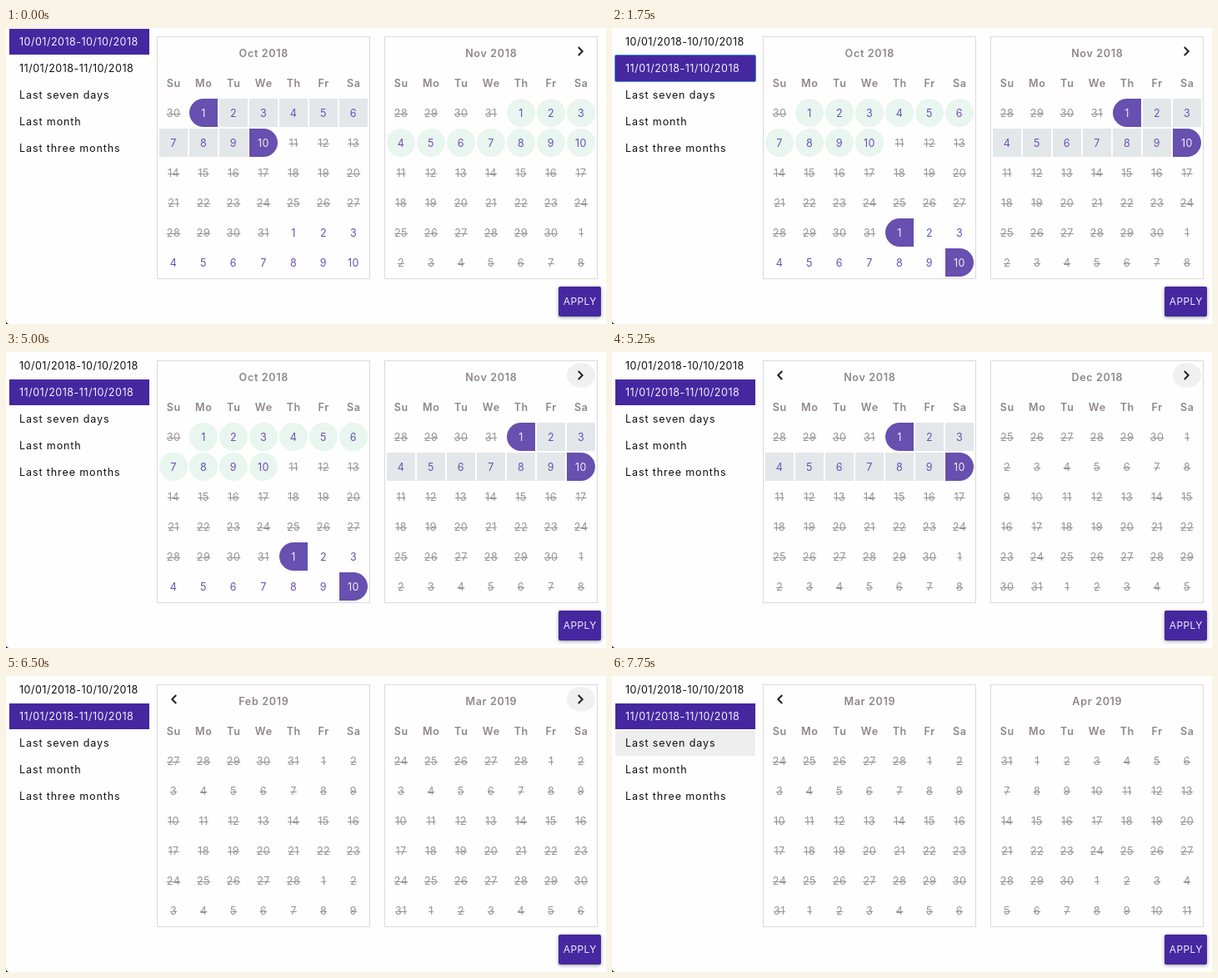
These frames come from a looping animation (720x356 px, 8 s). An HTML page with a canvas:

```html
<!DOCTYPE html>
<html lang="en">
<head>
<meta charset="utf-8">
<title>Date range picker</title>
<style>
  html, body { margin: 0; width: 100%; height: 100%; overflow: hidden; background: #fefefe; }
  canvas { display: block; width: 720px; height: 356px; }
</style>
</head>
<body>
<canvas id="stage" width="720" height="356"></canvas>
<script>
const ctx = document.getElementById('stage').getContext('2d');
const LOOP = 8000;
const FONT = 'Inter, "Open Sans", sans-serif';
const INDIGO = '#4527a0', VIOLET = '#6750b0', GREY = '#949494', HEAD = '#8e8787';
const MONTHS = 'Jan Feb Mar Apr May Jun Jul Aug Sep Oct Nov Dec'.split(' ');
const DAYS = 'Su Mo Tu We Th Fr Sa'.split(' ');
const PRESETS = ['10/01/2018-10/10/2018', '11/01/2018-11/10/2018',
  'Last seven days', 'Last month', 'Last three months'];

// Each step keeps the earlier values; month counts from January 2018.
const STEPS = [
  { at: 0, month: 9, picked: 0, focus: false, hoverItem: -1, hoverNext: false, fading: false },
  { at: 1250, focus: true, hoverItem: 1 },
  { at: 1500, picked: 1, hoverItem: -1 },
  { at: 4500, hoverNext: true },
  { at: 5000, focus: false },
  { at: 5250, month: 10 },
  { at: 5500, month: 11, fading: true },
  { at: 5750, month: 12, fading: false },
  { at: 6250, month: 13 },
  { at: 7250, month: 14, hoverNext: false },
  { at: 7750, hoverItem: 2 }
];
const FIRST = 9, LAST = 14;

function stateAt(time) {
  return Object.assign({}, ...STEPS.filter(step => step.at <= time));
}

function text(str, x, y, color, { size = 12.5, weight = 400, gap = 0.5, align = 'center' } = {}) {
  ctx.font = `${weight} ${size}px ${FONT}`;
  ctx.letterSpacing = gap + 'px';
  ctx.textAlign = align;
  ctx.fillStyle = color;
  ctx.fillText(str, x, y);
  return ctx.measureText(str).width;
}

function box(x, y, w, h, color, radii = 0) {
  ctx.fillStyle = color;
  ctx.beginPath();
  ctx.roundRect(x, y, w, h, radii);
  ctx.fill();
}

function drawPresets(s) {
  PRESETS.forEach((label, i) => {
    const y = 1 + 32 * i, on = i === s.picked;
    if (on) box(4, y, 168, 31, INDIGO);
    else if (i === s.hoverItem) box(4, y, 168, 31, '#eeeeee');
    if (i === 1 && s.focus) {
      ctx.strokeStyle = on ? '#4a8fd8' : '#8fb5ee';
      ctx.lineWidth = on ? 1 : 1.6;
      ctx.beginPath();
      ctx.roundRect(3.5, y - 0.5, 169, 32, 1.5);
      ctx.stroke();
    }
    text(label, 16, y + 20, on ? '#f4f1fb' : '#111111', { align: 'left', gap: i < 2 ? 0.5 : 0.9 });
  });
}

// dir is 1 for a right-pointing chevron, -1 for a left-pointing one
function chevron(x, dir) {
  ctx.strokeStyle = '#222222';
  ctx.lineWidth = 2;
  ctx.beginPath();
  ctx.moveTo(x - 2.5 * dir, 23);
  ctx.lineTo(x + 2.4 * dir, 28);
  ctx.lineTo(x - 2.5 * dir, 33);
  ctx.stroke();
}

function cornerRadii(start, end, inner) {
  return start ? [17, inner, inner, 17] : end ? [inner, 17, 17, inner] : inner;
}

function drawDay(date, x, y, inMonth, s) {
  const day = date.getDate(), m = date.getMonth(), year = date.getFullYear();
  const open = year === 2018 && (m === 9 || m === 10) && day <= 10;
  const chosen = open && m === 9 + s.picked;
  const start = chosen && day === 1, end = chosen && day === 10;
  let color = open ? VIOLET : GREY;

  if (start || end) {
    box(x, y, 34, 34, VIOLET, cornerRadii(start, end, 0));
    color = '#f0edf8';
  } else if (chosen && inMonth) {
    box(x, y, 34, 34, '#e3e7ea');
  } else if (open && inMonth) {
    box(x, y, 34, 34, '#e9f5ef', 17);
  }
  return { color, struck: !open };
}

// Leftover of the earlier selection, half way to vanishing
function drawFadingDay(i, x, y) {
  const start = i === 4, end = i === 13;
  if (start || end) {
    box(x, y, 34, 34, '#ab9dd4', cornerRadii(start, end, 8));
    return '#d0c8d6';
  }
  box(x, y, 34, 34, '#f0f2f3', 12);
  return '#77728f';
}

function drawMonth(month, left, fading, s) {
  box(left, 10, 256, 292, '#fefefe');
  ctx.strokeStyle = '#dadada';
  ctx.lineWidth = 1;
  ctx.strokeRect(left + 0.5, 10.5, 255, 291);
  const year = 2018 + Math.floor(month / 12);
  text(`${MONTHS[month % 12]} ${year}`, left + 128.3, 35, HEAD, { weight: 600, gap: 0.7 });
  DAYS.forEach((d, c) => text(d, left + 20.3 + 36 * c, 71, HEAD, { weight: 600, gap: 0.7 }));

  const lead = new Date(year, month % 12, 1).getDay();
  for (let i = 0; i < 42; i++) {
    const date = new Date(year, month % 12, 1 - lead + i);
    const x = left + 3 + 36 * (i % 7), y = 85 + 36 * Math.floor(i / 7);
    const look = drawDay(date, x, y, date.getMonth() === month % 12, s);
    if (fading && i >= 4 && i <= 13) look.color = drawFadingDay(i, x, y);
    const w = text(String(date.getDate()), x + 17, y + 22, look.color);
    if (look.struck) {
      ctx.fillRect(x + 17 - w / 2, y + 18, w, 1);
    }
  }
}

function drawArrows(s) {
  if (s.hoverNext) {
    ctx.fillStyle = '#f0f0f1';
    ctx.beginPath();
    ctx.ellipse(690, 28, 17, 15, 0, 0, Math.PI * 2);
    ctx.fill();
  }
  if (s.month > FIRST) chevron(201.7, -1);
  if (s.month < LAST) chevron(689.3, 1);
}

function drawApply() {
  ctx.save();
  ctx.shadowColor = 'rgba(0,0,0,0.4)';
  ctx.shadowBlur = 4;
  ctx.shadowOffsetY = 1;
  box(663, 311, 51, 36, INDIGO, 2);
  ctx.restore();
  text('APPLY', 688.8, 333, '#efebf8', { size: 12, gap: 0.4 });
}

function drawCorner() {
  ctx.fillStyle = '#222222';
  ctx.beginPath();
  ctx.moveTo(0, 352.5);
  ctx.quadraticCurveTo(0.5, 355.5, 3.5, 356);
  ctx.lineTo(0, 356);
  ctx.fill();
}

function draw(time) {
  const s = stateAt(time);
  ctx.fillStyle = '#fefefe';
  ctx.fillRect(0, 0, 720, 356);
  drawPresets(s);
  drawMonth(s.month, 181, s.fading, s);
  drawMonth(s.month + 1, 454, false, s);
  drawArrows(s);
  drawApply();
  drawCorner();
}

const began = performance.now();
function tick() {
  draw((performance.now() - began) % LOOP);
  requestAnimationFrame(tick);
}
tick();
</script>
</body>
</html>
```
